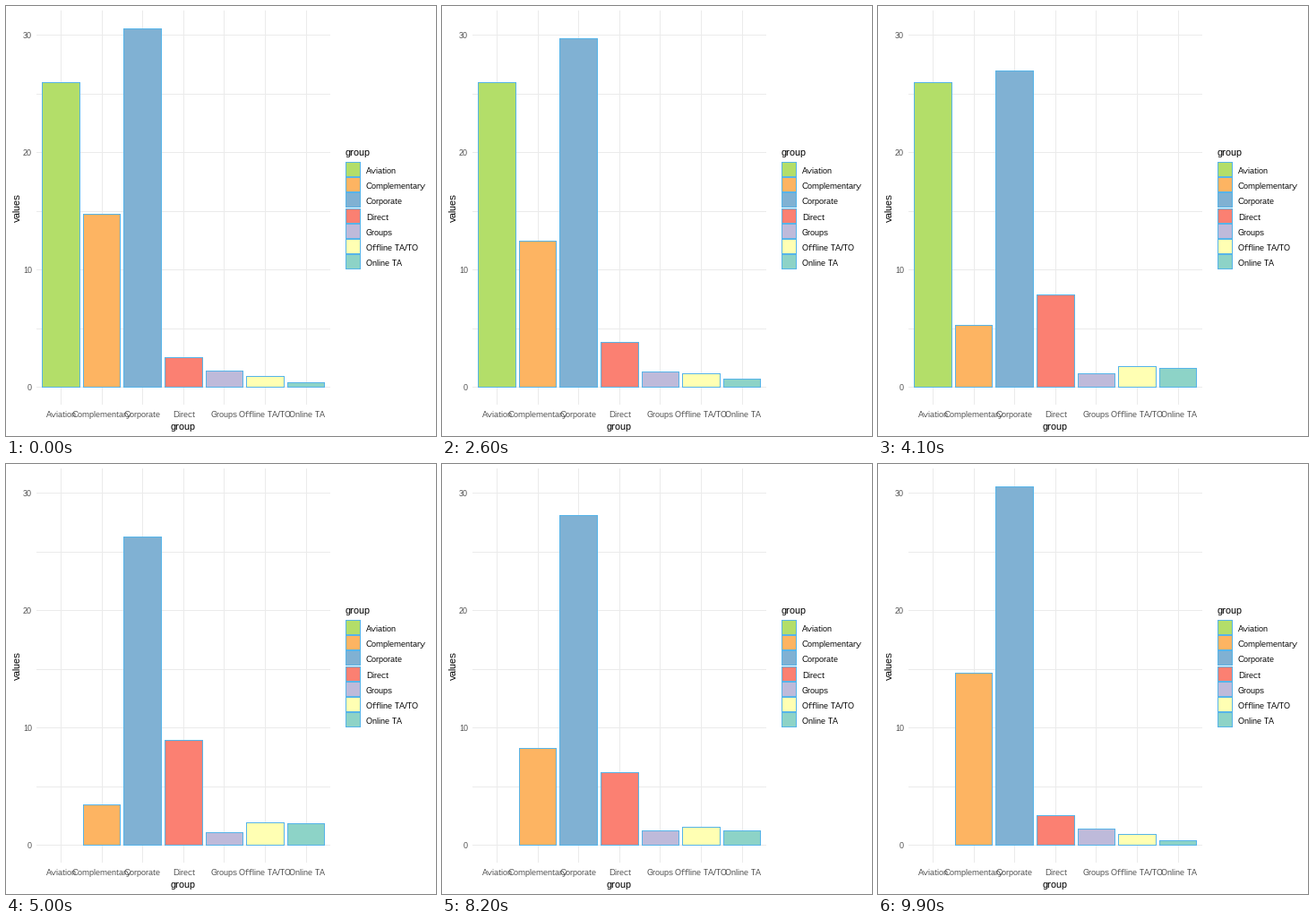
Recreate the animation shown at these times as a matplotlib script. Size 480x480 px, loop 10000 ms.

```python
import math

import matplotlib.pyplot as plt
from matplotlib.animation import FuncAnimation
from matplotlib.patches import Rectangle

plt.rcParams.update({
    "font.family": "Liberation Sans",
    "text.hinting": "native",
    "text.hinting_factor": 1,
    "text.kerning_factor": 6,
})

SIZE, DPI = 480, 72
FRAMES, STEP = 100, 100
ZERO, UNIT = 425.7, 13.1
EDGE, GRID, GREY = "#56B4E9", "#EBEBEB", "#4D4D4D"

# name, fill, first state, second state
GROUPS = [
    ("Aviation", "#B3DE69", 26.0, None),
    ("Complementary", "#FDB462", 14.73, 3.45),
    ("Corporate", "#80B1D3", 30.55, 26.3),
    ("Direct", "#FB8072", 2.55, 8.95),
    ("Groups", "#BEBADA", 1.4, 1.1),
    ("Offline TA/TO", "#FFFFB3", 0.95, 1.95),
    ("Online TA", "#8DD3C7", 0.43, 1.85),
]

fig = plt.figure(figsize=(SIZE / DPI, SIZE / DPI), dpi=DPI, facecolor="white")
ax = fig.add_axes([0, 0, 1, 1])
ax.set(xlim=(0, SIZE), ylim=(SIZE, 0))
ax.axis("off")


def row(value):
    return math.floor(ZERO - UNIT * value)


def rect(x, y, w, h, color, z=1):
    patch = Rectangle((x, y), w, h, fc=color, lw=0, antialiased=False, zorder=z)
    return ax.add_patch(patch)


def label(x, y, text, size=9, color="black", ha="left", **kw):
    ax.text(x, y, text, fontsize=size, color=color, ha=ha, va="baseline", **kw)


class Box:
    """Filled box with a one-pixel outline; corners are inclusive pixels."""

    def __init__(self, x0, y0, x1, y1, color):
        self.bottom = y1
        self.outer = rect(x0, y0, x1 - x0 + 1, y1 - y0 + 1, EDGE, 2)
        self.inner = rect(x0 + 1, y0 + 1, x1 - x0 - 1, y1 - y0 - 1, color, 3)

    def set_top(self, y):
        self.outer.set_y(y)
        self.outer.set_height(self.bottom - y + 1)
        self.inner.set_y(y + 1)
        self.inner.set_height(self.bottom - y - 1)

    def show(self, on):
        self.outer.set_visible(on)
        self.inner.set_visible(on)


for v in range(0, 31, 5):
    rect(34, row(v), 328, 1, GRID)
    if v % 10 == 0:
        label(29, row(v) + 4, str(v), color=GREY, ha="right")

bars = []
for i, (name, color, first, _) in enumerate(GROUPS):
    mid = math.floor(61.4 + 45.6 * i)
    rect(mid, 5, 1, 440, GRID)
    label(mid + 0.5, 459, name, color=GREY, ha="center")

    left, right = math.floor(40.6 + 45.65 * i), math.floor(82.3 + 45.57 * i)
    bars.append(Box(left, row(first), right, row(0), color))

    top = math.floor(174.3 + 17.28 * i)
    Box(379, top, 395, top + 16, color)
    label(402, top + 13, name)

label(198, 473, "group", 11, ha="center")
label(379, 167, "group", 11)
label(16, 225, "values", 11, ha="center", rotation=90, rotation_mode="anchor")


def ease(t):
    t = min(max(t, 0), 1)
    return (1 - math.cos(math.pi * t)) / 2


def update(n):
    mix = ease((n - 16) / 34) if n <= 50 else 1 - ease((n - 67) / 33)
    for bar, (_, _, a, b) in zip(bars, GROUPS):
        if b is None:
            bar.show(n < 50)
        else:
            bar.set_top(row(a + (b - a) * mix))
    return []


anim = FuncAnimation(fig, update, frames=FRAMES, interval=STEP,
                     repeat=True, repeat_delay=0, blit=False)
plt.show()
```
